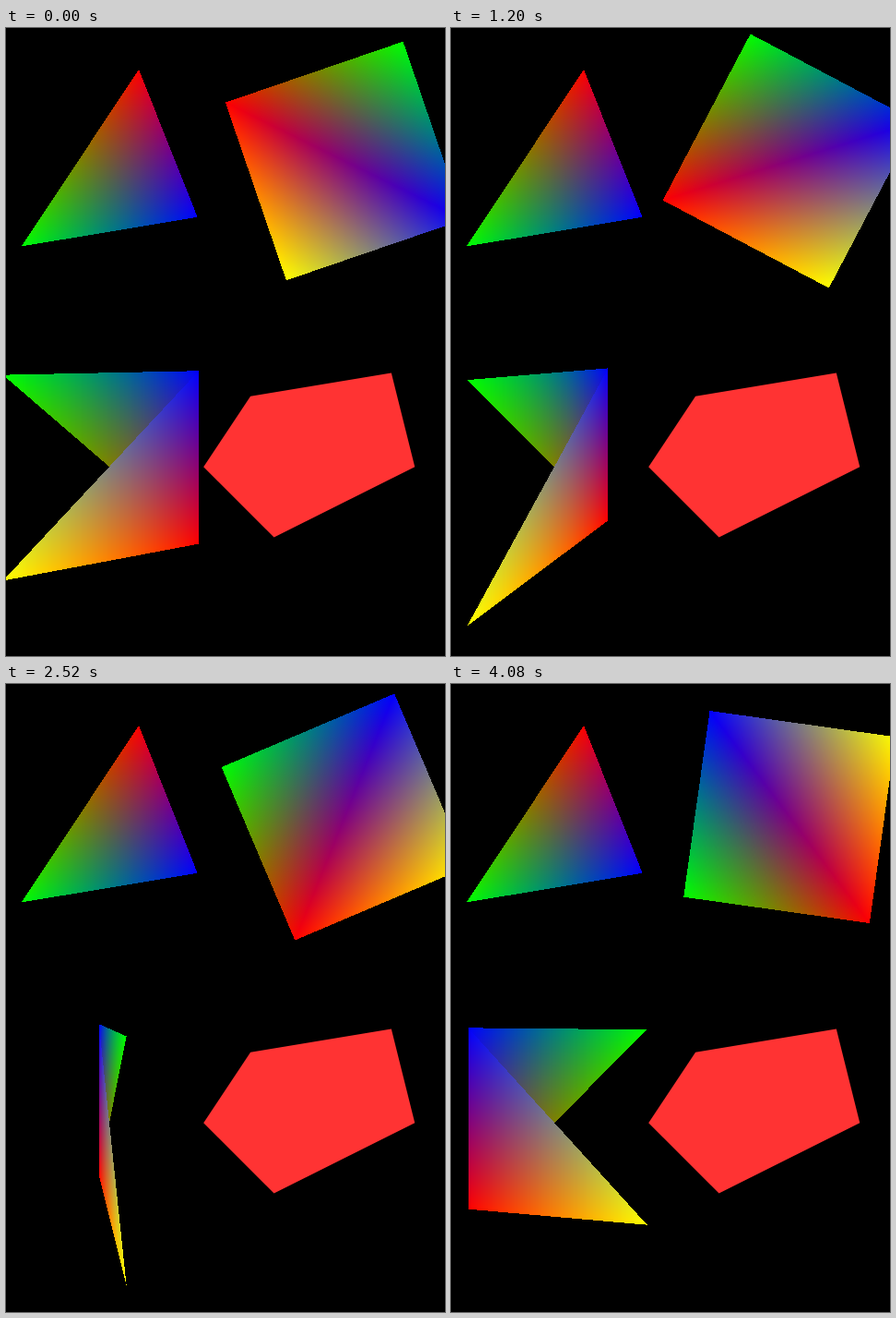
An HTML page with a canvas that plays this animation: 476x680 px, repeating every 4.14 s.

```html
<!DOCTYPE html>
<html lang="en">
<head>
<meta charset="utf-8">
<title>Spinning shapes</title>
<style>
  html, body { margin: 0; width: 100%; height: 100%; overflow: hidden; background: #000; }
  canvas { display: block; }
</style>
</head>
<body>
<canvas id="stage" width="476" height="680"></canvas>
<script>
const W = 476, H = 680, STEP = 60, LOOP = 4140;
const ctx = document.getElementById('stage').getContext('2d');
const image = ctx.createImageData(W, H);
const pixels = new Uint32Array(image.data.buffer);
const BLACK = 0xff000000;

const RED = [255, 0, 0], GREEN = [0, 255, 0], BLUE = [0, 0, 255], YELLOW = [255, 255, 0];
const UNIT = 127.25;   // pixels per world unit at the plane of the shapes
const HALF = 0.8;      // half the side of each square
const EYE = 3;         // distance of the viewer

// [step, degrees]: a nearly steady turn
const TURN = [[0, 18.9], [12, 45], [20, 62.2], [28, 82.3], [42, 113], [53, 138.2], [68, 172]];

function angleAt(step) {
  let i = 1;
  while (step > TURN[i][0]) i++;
  const [s0, a0] = TURN[i - 1], [s1, a1] = TURN[i];
  return (a0 + (a1 - a0) * (step - s0) / (s1 - s0)) * Math.PI / 180;
}

const vertex = (x, y, color, depth = 1) => ({ x, y, color, depth });
const cross = (a, b, x, y) => (b.x - a.x) * (y - a.y) - (b.y - a.y) * (x - a.x);

// Fills a triangle with perspective-correct colour blending.
function shade(a, b, c) {
  const area = cross(a, b, c.x, c.y);
  if (Math.abs(area) < 1e-6) return;
  const xs = [a.x, b.x, c.x], ys = [a.y, b.y, c.y];
  const left = Math.max(0, Math.floor(Math.min(...xs)));
  const right = Math.min(W - 1, Math.ceil(Math.max(...xs)));
  const top = Math.max(0, Math.floor(Math.min(...ys)));
  const bottom = Math.min(H - 1, Math.ceil(Math.max(...ys)));
  for (let y = top; y <= bottom; y++) {
    for (let x = left; x <= right; x++) {
      const px = x + 0.5, py = y + 0.5;
      let u = cross(b, c, px, py) / area;
      let v = cross(c, a, px, py) / area;
      let w = 1 - u - v;
      if (u < 0 || v < 0 || w < 0) continue;
      u /= a.depth; v /= b.depth; w /= c.depth;
      const sum = u + v + w;
      const mix = k => Math.round((u * a.color[k] + v * b.color[k] + w * c.color[k]) / sum);
      pixels[y * W + x] = (BLACK | mix(2) << 16 | mix(1) << 8 | mix(0)) >>> 0;
    }
  }
}

function drawTriangle() {
  shade(vertex(144, 45, RED), vertex(16.8, 236.4, GREEN), vertex(207.6, 204.8, BLUE));
}

function drawSquare(angle) {
  const radius = HALF * Math.SQRT2 * UNIT;
  const corner = (quarter, color) => {
    const a = angle + (quarter - 0.5) * Math.PI / 2;
    return vertex(367.2 - radius * Math.sin(a), 144 - radius * Math.cos(a), color);
  };
  const green = corner(0, GREEN), red = corner(1, RED);
  const yellow = corner(2, YELLOW), blue = corner(3, BLUE);
  shade(red, green, blue);
  shade(red, yellow, blue);
}

// Two overlapping halves of a square turning about its vertical axis.
function drawFlap(angle) {
  const corner = (sx, sy, color) => {
    const depth = 1 + sx * HALF * Math.sin(angle) / EYE;
    const scale = UNIT / depth;
    const x = -0.8235 + sx * HALF * Math.cos(angle);
    return vertex(216.8 + x * scale, 347.8 + (1 + sy * HALF) * scale, color, depth);
  };
  const green = corner(-1, -1, GREEN), blue = corner(1, -1, BLUE);
  const red = corner(1, 1, RED), yellow = corner(-1, 1, YELLOW);
  shade(green, blue, red);
  shade(blue, red, yellow);
}

function drawPentagon() {
  const grid = UNIT / 5;
  ctx.fillStyle = '#f33';
  ctx.beginPath();
  for (const [x, y] of [[0, 0], [2, -3], [8, -4], [9, 0], [3, 3]]) {
    ctx.lineTo(214.2 + x * grid, 475.2 + y * grid);
  }
  ctx.fill();
}

function draw(step) {
  const angle = angleAt(step);
  pixels.fill(BLACK);
  drawTriangle();
  drawSquare(angle);
  drawFlap(angle);
  ctx.putImageData(image, 0, 0);
  drawPentagon();
}

const start = performance.now();
let shown = -1;
function tick() {
  const step = Math.floor((performance.now() - start) % LOOP / STEP);
  if (step !== shown) draw(shown = step);
  requestAnimationFrame(tick);
}
tick();
</script>
</body>
</html>
```
